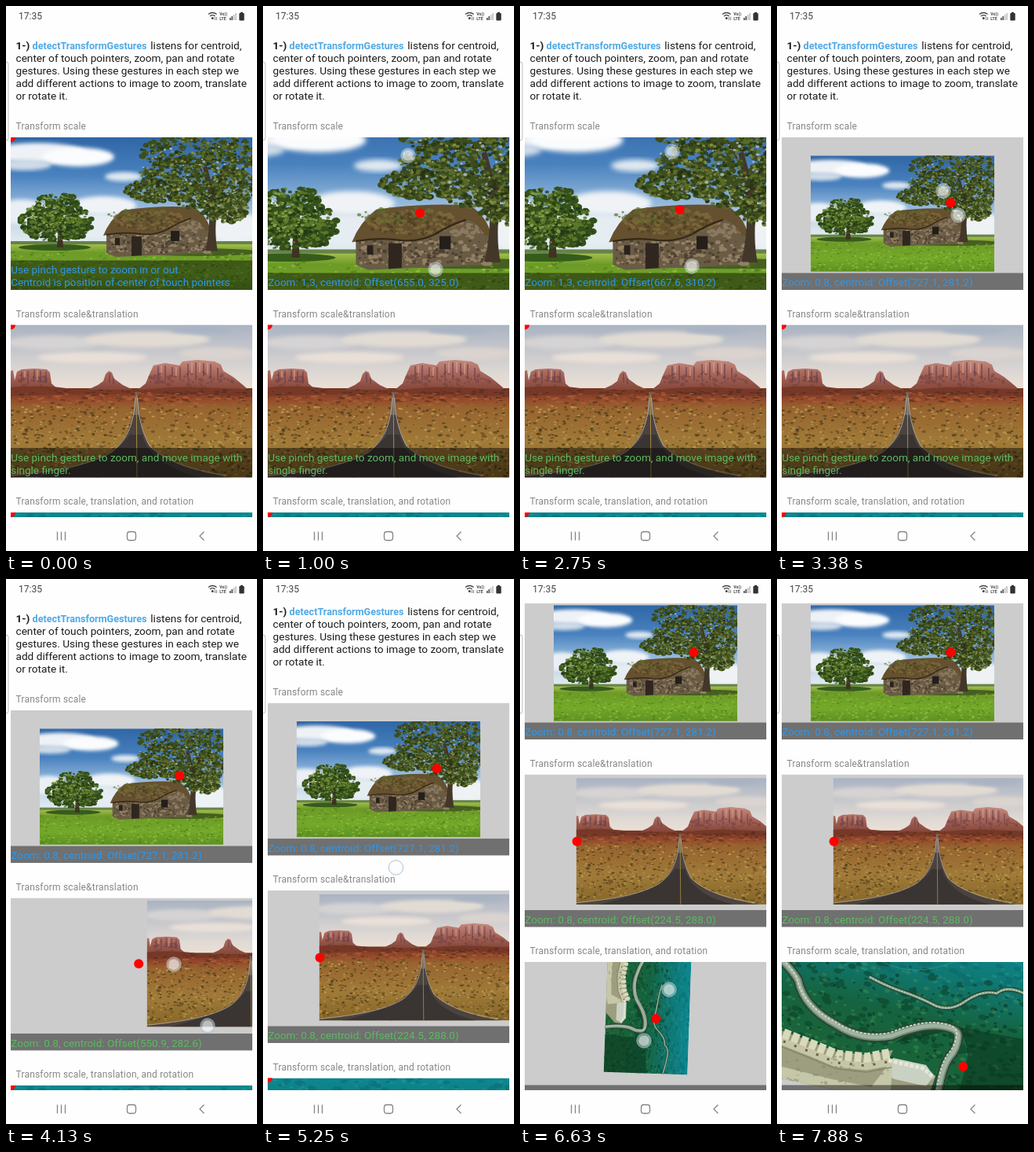
Write an HTML page that moves like this. It is 320 px wide and 693 px high and loops after 8010 ms.

```html
<!DOCTYPE html>
<html lang="en">
<head>
<meta charset="utf-8">
<title>Transform gestures</title>
<style>
html, body { margin: 0; width: 100%; height: 100%; overflow: hidden; background: #fefefe; }
#stage { display: block; width: 320px; height: 693px; font-family: Roboto, "Noto Sans", sans-serif; }
text { white-space: pre; }
.body { font-size: 13.65px; fill: #1c1c1c; }
.title { font-size: 12px; letter-spacing: .19px; fill: #868686; }
.cap { font-size: 13.55px; }
</style>
</head>
<body>
<svg id="stage" viewBox="0 0 320 693"></svg>
<script>
const LOOP = 8010, STEP = 125, W = 308, H = 194, PX = 320 / 1080;
const stage = document.getElementById('stage');

let seed = 7;
const rnd = () => (seed = (seed * 16807) % 2147483647) / 2147483647;
const inBox = (x, y, w, h) => () => [x + rnd() * w, y + rnd() * h];
const inOval = (cx, cy, rx, ry) => () => {
  const a = rnd() * Math.PI * 2, q = Math.sqrt(rnd());
  return [cx + Math.cos(a) * q * rx, cy + Math.sin(a) * q * ry];
};

// many small flattened dots as a single path
function spots(n, place, size, fill, opacity = 1, flat = .7) {
  let d = '';
  for (let i = 0; i < n; i++) {
    const [x, y] = place(), r = size * (.5 + rnd());
    const arc = s => `a${r.toFixed(1)} ${(r * flat).toFixed(1)} 0 1 0 ${(2 * r * s).toFixed(1)} 0`;
    d += `M${(x - r).toFixed(1)} ${y.toFixed(1)}${arc(1)}${arc(-1)}`;
  }
  return `<path d="${d}" fill="${fill}" opacity="${opacity}"/>`;
}
const shape = (d, fill, extra = '') => `<path d="${d}" fill="${fill}" ${extra}/>`;
const line = (d, stroke, width, extra = '') =>
  `<path d="${d}" fill="none" stroke="${stroke}" stroke-width="${width}" ${extra}/>`;
const oval = (x, y, rx, ry, fill, extra = '') =>
  `<ellipse cx="${x}" cy="${y}" rx="${rx}" ry="${ry}" fill="${fill}" ${extra}/>`;
const rect = (x, y, w, h, fill, extra = '') =>
  `<rect x="${x}" y="${y}" width="${w}" height="${h}" fill="${fill}" ${extra}/>`;
const text = (x, y, cls, s, extra = '') => `<text x="${x}" y="${y}" class="${cls}" ${extra}>${s}</text>`;
const fade = (id, ...stops) => `<linearGradient id="${id}" x2="0" y2="1">` + stops.map(([o, c]) =>
  `<stop offset="${o}" stop-color="${c}"/>`).join('') + '</linearGradient>';

const defs = '<defs>' +
  fade('sky', [0, '#2f66a6'], [.35, '#4a82bf'], [.6, '#8fb5da'], [.85, '#d3e1ec'], [1, '#e9eff0']) +
  fade('grass', [0, '#a3bd4c'], [.18, '#6c9a26'], [.6, '#74a92a'], [1, '#5b8f20']) +
  fade('dusk', [0, '#a9b3c2'], [.35, '#c5c6cb'], [.7, '#dfd9d4'], [1, '#efe3d6']) +
  fade('desert', [0, '#6f3622'], [.12, '#94482a'], [.22, '#97642f'], [.6, '#a07a38'], [1, '#846528']) +
  fade('rock', [0, '#c48a7c'], [.45, '#aa675b'], [1, '#84473a']) +
  fade('hills', [0, '#0c8791'], [.28, '#10756c'], [.5, '#15633f'], [1, '#1d6434']) +
  '<filter id="soft" x="-20%" y="-20%" width="140%" height="140%"><feGaussianBlur stdDeviation="2.500"/></filter></defs>';

function cottage() {
  const soft = 'filter="url(#soft)"';
  let s = rect(6, 167, W, 140, 'url(#sky)');
  s += oval(40, 187, 62, 13, '#eef2f6', soft) + oval(92, 192, 46, 12, '#fbfcfd', soft) + oval(24, 202, 34, 7, '#cfdbe8', soft) +
    oval(150, 217, 24, 6, '#dfe8f0', soft) + oval(20, 262, 36, 16, '#e9eff4', soft) +
    oval(124, 254, 42, 12, '#eff3f6', soft) + oval(110, 280, 70, 16, '#e6edf2', soft) + oval(292, 282, 34, 20, '#eef2f4', soft);
  s += rect(6, 299, W, 5, '#66834a') + rect(6, 303, W, 60, 'url(#grass)');
  s += oval(62, 307, 46, 4, '#365c1c') + oval(245, 313, 78, 5, '#465f20');
  s += spots(220, inBox(6, 314, W, 46), 1.7, '#a3cd4a', .55, .5) + spots(220, inBox(6, 311, W, 49), 1.6, '#44741a', .55, .5);
  s += shape('M65 307L67 278H71L73 307Z', '#3f3320');
  const crown = [[64, 258, 30, 22], [45, 275, 27, 19], [84, 276, 27, 21], [63, 285, 42, 14]];
  for (const c of crown) s += spots(110, inOval(...c), 3.2, '#34501b');
  for (const c of crown) s += spots(75, inOval(c[0], c[1] - 2, c[2], c[3]), 1.7, '#5f7c2c', .85);
  for (const c of crown) s += spots(40, inOval(...c), 1.6, '#1f3312', .7);
  s += spots(70, inOval(58, 264, 34, 22), 1.3, '#94a952', .8);
  // stone walls and thatched roof
  s += shape('M128 288L206 280L238 262L260 283L262 314L140 319L128 314Z', '#6a5b45');
  s += spots(110, inBox(131, 291, 128, 23), 1.9, '#a08d70', .75) + spots(30, inOval(238, 281, 16, 9), 1.9, '#9a876a', .7) +
    spots(110, inBox(131, 289, 128, 25), 1.4, '#40362a', .75);
  s += shape('M160 293H173V317L160 318Z', '#2f271f') + rect(210, 286, 11, 13, '#241f1a') + rect(139, 295, 6, 9, '#28221b');
  s += shape('M124 292Q132 272 148 260Q195 253 240 256Q256 266 261 285L255 286Q246 271 236 270Q218 276 206 284Q190 291 172 290Q150 287 124 292Z', '#65512f');
  s += spots(110, inOval(184, 272, 46, 12), 1.8, '#86703f', .65) + spots(60, inOval(172, 266, 42, 8), 1.6, '#5f6a2c', .7) +
    spots(70, inOval(184, 274, 46, 11), 1.5, '#45371f', .6);
  s += line('M128 291Q150 287 172 290Q190 292 206 284Q220 275 236 270', '#352818', 1.8);
  // large tree
  s += shape('M254 311Q262 280 258 238L251 205L256 203L264 232L284 200L288 202L271 242Q264 285 270 312Z', '#43372a');
  s += line('M261 246L228 222L200 218M266 250L298 232M259 228L240 192', '#43372a', 2.2);
  const leaves = [[225, 186, 54, 20], [284, 190, 34, 26], [188, 235, 36, 14], [213, 213, 42, 18],
    [245, 240, 36, 18], [290, 230, 28, 24], [280, 260, 30, 16]];
  for (const c of leaves) s += spots(115, inOval(...c), 3, '#3c4d1d');
  for (const c of leaves) s += spots(80, inOval(...c), 1.7, '#5e6f2a', .85);
  for (const c of leaves) s += spots(55, inOval(...c), 1.7, '#232f13', .75);
  for (const c of leaves) s += spots(32, inOval(...c), 1.3, '#939a51', .75);
  s += spots(50, inOval(240, 212, 70, 42), 1.3, '#b4c8d8', .75);
  return s;
}

function desert() {
  const soft = 'filter="url(#soft)"';
  let s = rect(6, 405, W, 90, 'url(#dusk)');
  s += oval(60, 428, 60, 9, '#d5d3d3', soft) + oval(180, 424, 80, 10, '#e2dbd3', soft) + oval(270, 442, 50, 8, '#dad3cf', soft) +
    oval(110, 447, 70, 7, '#e9e0d8', soft) + oval(250, 412, 40, 5, '#a9b3c3', soft);
  s += rect(6, 486, W, 114, 'url(#desert)');
  s += shape('M6 487V464L9 463L11 476L14 465L20 462L36 461L52 462L56 466L58 480L66 487Z' +
    'M104 488L117 482L124 477L127 468L131 464L135 466L138 474L149 482L162 488Z' +
    'M168 488L178 480L183 468L188 457L203 454L221 457L225 452L244 450L266 452L274 456L277 464L290 472L301 481L309 488Z', 'url(#rock)');
  s += line('M20 465V478M28 464V480M36 463V478M44 464V479M51 465V480M132 467V479M137 473V481M194 458V474M203 457V476M212 459V472' +
    'M222 459V476M232 455V474M242 453V476M252 454V471M261 455V475M270 460V476', '#624154', 2, 'opacity=".6"');
  s += line('M24 464V474M40 463V476M198 457V470M217 459V470M237 453V468M247 453V466M257 454V468', '#e0ab9a', 1.6, 'opacity=".6"');
  s += spots(60, inOval(236, 475, 56, 10), 2, '#6b3f40', .5) + spots(24, inOval(32, 476, 24, 8), 2, '#6b3f40', .5);
  s += shape('M6 485Q50 481 90 488T170 489T250 485T314 487V497Q200 490 6 496Z', '#773827');
  s += spots(140, inBox(6, 488, W, 17), 2.5, '#492a1e', .6, .3) + spots(80, inBox(6, 492, W, 18), 3, '#b5693f', .6, .3);
  s += spots(320, inBox(6, 506, W, 93), 1.9, '#5d461f', .7, .5) + spots(360, inBox(6, 508, W, 91), 1.5, '#c3a057', .75, .5) +
    spots(230, inBox(6, 510, W, 89), 1.6, '#3d3319', .65, .6);
  s += shape('M165 491C163 525 157 549 135 567C108 585 50 593 6 598V600H290C232 592 200 576 183 560C172 538 170 520 167.5 491Z', '#4a4340');
  s += shape('M165 491L162 520H170L167.5 491Z', '#756a64') + shape('M158 545C140 574 80 590 40 600H250C205 590 180 570 174 545Z', '#3a3533');
  s += line('M165 498C163 528 157 550 135 567C108 584 60 592 6 597M167.500 498C169 523 173 541 183 559C200 575 226 588 280 597', '#b9b0a4', .9);
  s += line('M166.300 495L166.500 540L167 600', '#a98a45', 1);
  return s;
}

// the wall is laid out as seen after the last gesture, then mapped back to picture space
function wall() {
  let s = rect(0, 0, W, H, 'url(#hills)');
  s += spots(130, inBox(0, 0, W, 62), 4, '#0b6069', .4, .5) + spots(130, inBox(0, 0, W, 60), 2.4, '#2fa093', .35, .5);
  s += spots(320, inBox(0, 45, W, 149), 3.6, '#0b3d26', .5, .6) + spots(320, inBox(0, 50, W, 144), 2.1, '#459054', .45, .6) +
    spots(180, inBox(0, 50, W, 144), 1.6, '#08281a', .5, .7);
  s += line('M0 32Q50 16 95 40T190 30T308 42', '#45a096', .9, 'opacity=".5"');
  let g = shape('M150 590Q200 555 232 575Q250 595 238 630L210 720H420V600Q270 580 240 570Z', '#08301d', 'opacity=".5"');
  const ridge = 'M118 506Q140 518 161 525Q182 532 203 543Q222 550 240 537Q262 522 280 527Q292 517 313 526Q340 536 380 560';
  g += line(ridge, '#24452f', 6) + line(ridge, '#88a892', 3.2) + line(ridge, '#cfdccd', 1, 'stroke-dasharray="2 2"');
  const path = 'M-20 462Q14 488 27 510Q34 545 76 567Q108 588 146 581Q180 567 203 568Q232 570 231 582Q230 597 220 608Q206 628 203 680';
  g += line(path, '#294633', 13) + line(path, '#748b77', 9) + line(path, '#9fb3a1', 5) +
    line(path, '#d2dccb', 1.8, 'stroke-dasharray="3 2" transform="translate(-2 -4)"');
  g += shape('M-50 560L6 574L42 588L76 601L114 605L148 599L142 612L186 620L202 632L196 650L160 672L-50 660Z', '#9d9d80');
  g += shape('M148 609L190 618L200 632L190 645L150 636L134 628Z', '#c9d1c2') + shape('M-50 606L6 620L70 636L120 646L134 628L148 612L144 660L-50 660Z', '#c6c7a9');
  const top = 'M-50 563L6 577L42 591L76 605L114 609L146 603';
  g += line(top, '#d9d9bb', 13, 'stroke-dasharray="9 3"') + line(top, '#c6c6a6', 9, 'transform="translate(0 11)"') +
    line(top, '#5c624c', 3, 'stroke-dasharray="3 12" transform="translate(0 10)"') +
    line(top, '#85866a', 1.4, 'transform="translate(0 18)"');
  g += line('M142 612L186 622L200 634', '#e6e6d8', 5, 'stroke-dasharray="5 2"');
  g += spots(50, inOval(70, 625, 80, 18), 1.6, '#7f8568', .5);
  return s + `<g transform="translate(154 97) scale(.855) rotate(-12) translate(-170 -554)">${g}</g>`;
}

function card(i, y, view, art, lines, color) {
  return `<svg x="6" y="${y}" width="${W}" height="${H}">` + rect(0, 0, W, H, '#ccc') +
    `<g id="pic${i}"><svg width="${W}" height="${H}" viewBox="${view} ${W} ${H}">${art}</svg></g>` +
    `<circle id="dot${i}" r="6" fill="#f00"/><rect id="bar${i}" width="${W}" height="38" fill="#000" fill-opacity=".45"/>` +
    text(.2, 173.3, 'cap', lines[0], `id="first${i}" fill="${color}"`) +
    text(.2, 189.3, 'cap', lines[1], `id="last${i}" fill="${color}"`) + '</svg>';
}

const intro = ['center of touch pointers, zoom, pan and rotate', 'gestures. Using these gestures in each step we',
  'add different actions to image to zoom, translate', 'or rotate it.'];

const content = text(12.5, 55, 'body', '1-)', 'font-weight="700"') +
  text(33.6, 55, 'body', 'detectTransformGestures', 'style="font-size:12.6px;fill:#4fa9e6;font-weight:600"') +
  text(184.3, 55, 'body', 'listens for centroid,') +
  intro.map((s, i) => text(12.5, 71 + 16 * i, 'body', s)).join('') +
  text(12.5, 157.3, 'title', 'Transform scale') +
  text(12.5, 395.8, 'title', 'Transform scale&amp;translation') +
  text(12.5, 634.3, 'title', 'Transform scale, translation, and rotation') +
  card(1, 167, '6 167', cottage(), ['Use pinch gesture to zoom in or out.', 'Centroid is position of center of touch pointers'], '#2e97ea') +
  card(2, 405.5, '6 405.5', desert(), ['Use pinch gesture to zoom, and move image with', 'single finger.'], '#5cba60') +
  card(3, 644, '0 0', wall(), ['', ''], '#fff');

const status = text(16, 17.4, 'clock', '17:35', 'font-size="12.1" fill="#444"') +
  line('M258 10.6Q263.300 6.400 268.600 10.600M260 13Q263.300 10.400 266.600 13', '#444', 1.3) + oval(263.3, 15.6, 1.5, 1.5, '#444') +
  line('M266.500 14V18M268.500 14V18', '#666', .8) +
  text(272.3, 12.3, 'net', 'Vo))', 'font-size="5.2" font-weight="700" fill="#444"') +
  text(272.3, 17.8, 'net', 'LTE', 'font-size="5.2" font-weight="700" fill="#444"') +
  [0, 1, 2, 3].map(i => rect(285 + i * 2.4, 15 - i * 2, 1.7, 3 + i * 2, i < 2 ? '#555' : '#c4c4c4')).join('') +
  rect(297.3, 9, 6.4, 9.4, '#333', 'rx="1.2"') + rect(299, 7.8, 3, 2, '#333');

const nav = line('M65.500 668.500V679.500M70.500 668.500V679.500M75.500 668.500V679.500', '#858585', 1.3) +
  rect(154.5, 668.5, 11, 11, 'none', 'rx="3.2" stroke="#858585" stroke-width="1.3"') +
  line('M252.500 668.500L247 674L252.500 679.500', '#858585', 1.3);

const finger = i => `<g id="tip${i}"><circle r="9.2" fill="#f4f7fa" fill-opacity=".42" stroke="#9fb2c4" stroke-opacity=".8"/>` +
  '<circle r="6.8" fill="#fff" fill-opacity=".45"/></g>';

stage.innerHTML = defs + rect(0, 0, 320, 693, '#fefefe') +
  `<svg y="31" width="320" height="619" viewBox="0 31 320 619"><g id="page">${content}</g></svg>` +
  status + nav + rect(-6, 71, 9, 100, '#fff', 'rx="3" stroke="#bcbcbc"') + finger(0) + finger(1);

const $ = id => document.getElementById(id);

// keys: time, zoom, angle, shift x, shift y, centroid x, centroid y
const poses = [
  [[250, 1, 0, 0, 0, 640, 340], [1000, 1.3, 0, 0, 0, 655, 325], [1875, .623, 0, 0, 0, 636.3, 349.3],
    [2750, 1.3, 0, 0, 0, 667.6, 310.2], [3375, .76, 0, 0, 0, 727.1, 281.2]],
  [[3625, 1, 0, 0, 0, 620, 300], [4125, .827, 0, 147, -13.5, 550.9, 282.6], [4875, .827, 0, 39, -12, 224.5, 288]],
  [[6125, 1, 0, 0, 0, 570, 270], [6625, .55, 92, 3, -40, 564.6, 243], [7750, 1.17, 12, 10, -30, 780.6, 449]]
];
const scrolls = [[5000, 0], [5250, 9.4], [5750, 157]];
// keys: time, then x and y per finger
const touches = [
  [[250, 184, 238, 213, 300], [1000, 185, 190, 220, 335], [1875, 199, 274, 211, 293], [2750, 194, 185, 219, 331], [3375, 212, 235, 231, 266]],
  [[3625, 150, 440, 235, 590], [4125, 214, 490, 257, 568]],
  [[4250, 170, 489], [4875, 73, 491]],
  [[5125, 169.5, 372], [5250, 169.5, 367], [5625, 169.5, 250]],
  [[6125, 115, 530, 233, 588], [6625, 190, 522, 158, 587], [7750, 170, 595, 304, 645]]
];

function at(keys, t) {
  const n = keys.findIndex(k => k[0] >= t);
  if (n === 0) return keys[0].slice(1);
  if (n < 0) return keys[keys.length - 1].slice(1);
  const a = keys[n - 1], b = keys[n], u = (t - a[0]) / (b[0] - a[0]), e = u * u * (3 - 2 * u);
  return a.slice(1).map((v, i) => v + (b[i + 1] - v) * e);
}

const notes = [1, 2].map(i => $('last' + i).textContent);

function draw(ms) {
  const t = Math.floor(ms / STEP) * STEP;
  $('page').setAttribute('transform', `translate(0 ${-at(scrolls, t)[0]})`);
  poses.forEach((keys, n) => {
    const i = n + 1, active = t > keys[0][0];
    const [z, angle, dx, dy, cx, cy] = active ? at(keys, t) : [1, 0, 0, 0, 0, 0];
    $('pic' + i).setAttribute('transform',
      `translate(${154 + dx} ${97 + dy}) rotate(${angle}) scale(${z}) translate(-154 -97)`);
    $('dot' + i).setAttribute('transform', `translate(${cx * PX} ${cy * PX})`);
    if (n === 2) return $('bar3').setAttribute('y', 156.5);
    $('bar' + i).setAttribute('y', active ? 172.5 : 156.5);
    $('first' + i).setAttribute('visibility', active ? 'hidden' : 'visible');
    $('last' + i).textContent = active
      ? `Zoom: ${z.toFixed(1)}, centroid: Offset(${cx.toFixed(1)}, ${cy.toFixed(1)})` : notes[n];
  });
  const keys = touches.find(k => t >= k[0][0] && t <= k[k.length - 1][0]);
  const tips = keys ? at(keys, t) : [];
  for (const i of [0, 1]) {
    const shown = tips.length > 2 * i;
    $('tip' + i).setAttribute('visibility', shown ? 'visible' : 'hidden');
    if (shown) $('tip' + i).setAttribute('transform', `translate(${tips[2 * i]} ${tips[2 * i + 1]})`);
  }
}

const start = performance.now();
function tick() {
  draw((performance.now() - start) % LOOP);
  requestAnimationFrame(tick);
}
tick();
</script>
</body>
</html>
```
